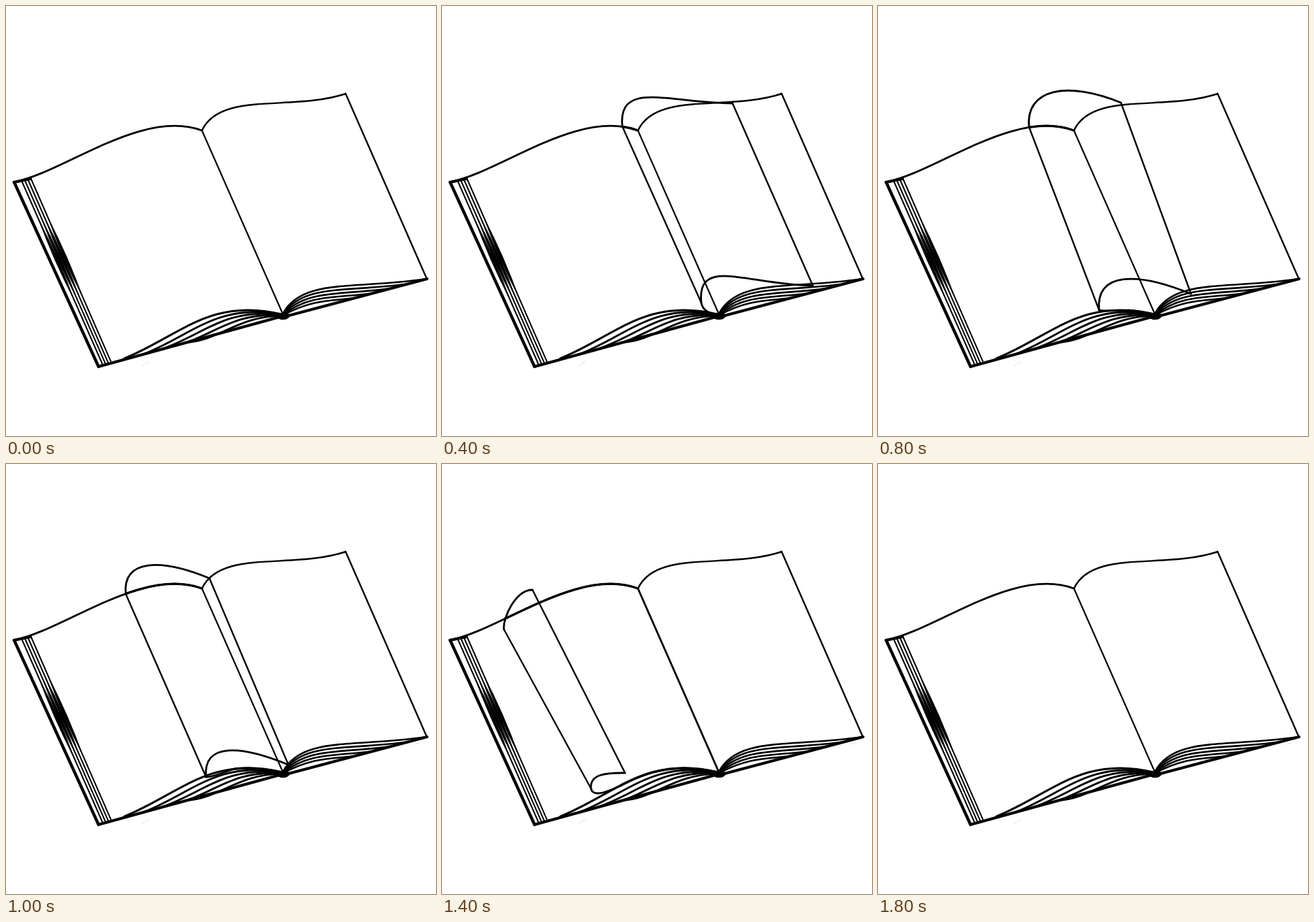
An HTML page with a canvas for the animation above (1.9 s loop, 632 by 632 pixels).

```html
<!DOCTYPE html>
<html lang="en">
<head>
<meta charset="utf-8">
<title>Turning page</title>
<style>
  html, body { margin: 0; width: 100%; height: 100%; overflow: hidden; background: #fff; }
  canvas { display: block; width: 632px; height: 632px; }
</style>
</head>
<body>
<canvas id="stage" width="632" height="632"></canvas>
<script>
const SIZE = 632, STEP = 100, STEPS = 19;
const ctx = document.getElementById('stage').getContext('2d');

const SPINE = [[288, 183], [407, 453]];
const RIGHT_EDGE = [[499, 128.5], [618.5, 401]];
const LEFT_EDGE = [[12, 259], [136, 530]];
const LEFT_TOP = [[11, 259], [85, 245], [200, 150], [288, 183]];
const RIGHT_TOP = [[288, 183], [315, 125], [420, 155], [499, 129]];
const LEFT_BOTTOM = [[174, 518], [255, 485], [300, 428], [405, 453]];

// Ends of the sheet's fold and of its free edge at a few steps of the turn.
const POSES = [
  { step: 0, fold: SPINE, free: RIGHT_EDGE },
  { step: 4, fold: [[265, 177], [381, 436]], free: [[427, 143], [545, 411]] },
  { step: 8, fold: [[222, 178], [325, 447]], free: [[357, 142], [460, 423]] },
  { step: 10, fold: [[176, 191], [294, 460]], free: [[299, 168], [415, 442]] },
  { step: 12, fold: [[119, 200], [249, 458]], free: [[219, 153], [338, 425]] },
  { step: 14, fold: [[91, 243], [219, 477]], free: [[133, 185], [269, 454]] },
  { step: 17, fold: [[26, 254], [160, 504]], free: [[28, 245], [162, 502]] }
];

const mix = (a, b, k) => a + (b - a) * k;
const mixPoint = (p, q, k) => [mix(p[0], q[0], k), mix(p[1], q[1], k)];

function poseAt(step) {
  const next = Math.max(1, POSES.findIndex(p => p.step >= step));
  const a = POSES[next - 1], b = POSES[next];
  const k = (step - a.step) / (b.step - a.step);
  const between = edge => a[edge].map((p, i) => mixPoint(p, b[edge][i], k));
  return { fold: between('fold'), free: between('free') };
}

function pointOn(curve, k) {
  let pts = curve;
  while (pts.length > 1) pts = pts.slice(1).map((p, i) => mixPoint(pts[i], p, k));
  return pts[0];
}

function pointAtX(curve, x) {
  let low = 0, high = 1;
  for (let i = 0; i < 20; i++) {
    const mid = (low + high) / 2;
    if (pointOn(curve, mid)[0] < x) low = mid; else high = mid;
  }
  return pointOn(curve, low);
}

function stroke(width, color = '#000') {
  ctx.lineWidth = width;
  ctx.strokeStyle = color;
  ctx.stroke();
}

function line([a, b], width, color) {
  ctx.beginPath();
  ctx.moveTo(...a);
  ctx.lineTo(...b);
  stroke(width, color);
}

function curve([a, b, c, d], width) {
  ctx.beginPath();
  ctx.moveTo(...a);
  if (d) ctx.bezierCurveTo(...b, ...c, ...d);
  else ctx.quadraticCurveTo(...b, ...c);
  stroke(width);
}

// A sliver that swells in the middle, lying along the line a-b.
function lens(a, b, swell) {
  const [x, y] = mixPoint(a, b, 0.5);
  ctx.beginPath();
  ctx.moveTo(...a);
  ctx.quadraticCurveTo(x - swell, y, ...b);
  ctx.quadraticCurveTo(x + swell, y, ...a);
  ctx.fill();
}

function rightOf(x, draw) {
  ctx.save();
  ctx.beginPath();
  ctx.rect(x, 0, SIZE - x, SIZE);
  ctx.clip();
  draw();
  ctx.restore();
}

function drawLeftSide() {
  line(LEFT_EDGE, 4.4);
  line([[12, 259], [36, 254]], 4);
  for (let i = 0; i < 4; i++) {
    const a = [23 + 4.6 * i, 257 - i], b = [142 + 4 * i, 527 - 1.6 * i];
    line([a, b], 2);
    lens(mixPoint(a, b, 0.2), mixPoint(a, b, 0.66), 5.5);
  }
}

function drawPageEnds() {
  const leftBase = x => [x, 530 - (x - 136) * 0.274];
  const rightBase = x => [x, 456 - (x - 410) * 0.264];
  line([LEFT_EDGE[1], [406, 456]], 4.4);
  line([[408, 457], [619, 401]], 4);
  curve(LEFT_BOTTOM, 3);
  for (let i = 1; i < 5; i++) {
    curve([leftBase(178 + 22 * i), [255 + 15 * i, 485 + 1.5 * i],
      [300 + 10 * i, 428 + 7 * i], [405, 453 + 0.6 * i]], 2.9);
  }
  for (let i = 0; i < 5; i++) {
    curve([[407, 452 + 0.7 * i], [435 + 3 * i, 400 + 8 * i],
      [510 - 8 * i, 417 + 4 * i], rightBase(618 - 27 * i)], 2.6);
  }
  ctx.beginPath();
  ctx.ellipse(408, 456, 9, 5, -0.1, 0, Math.PI * 2);
  ctx.fill();
}

function drawBook() {
  curve(LEFT_TOP, 2.9);
  curve(RIGHT_TOP, 2.4);
  line(RIGHT_EDGE, 2.4);
  line(SPINE, 2.2);
  drawLeftSide();
  drawPageEnds();
  line([[200, 529], [211, 522]], 1, '#e4e4e4');
  line([[601, 412], [608, 410]], 1, '#e4e4e4');
}

function drawSheet(step) {
  const { fold, free } = poseAt(step);
  const rise = 0.42 * Math.min(1, 0.55 + 0.12 * step);
  const lift = 0.28 * Math.exp(-(((step - 9) / 2.5) ** 2));

  fold.forEach((a, i) => {
    const b = free[i], width = b[0] - a[0];
    curve([a, [a[0] - 0.04 * width, a[1] - rise * width],
      [b[0] - 0.58 * width, b[1] - lift * width], b], 2.8);
  });
  line(fold, 2.4);
  line(free, 2.4);

  // Below the fold the sheet settles onto the left page.
  const [x, y] = fold[1];
  const contact = pointAtX(LEFT_BOTTOM, Math.min(405, x + 42));
  curve([fold[1], [x + 3, y + 16 - 60 * lift], contact], 2.8);
  rightOf(contact[0], () => curve(LEFT_BOTTOM, 3.6));
  rightOf(fold[0][0], () => curve(LEFT_TOP, 3.3));
  if (step > 10) line(SPINE, 2.7);
}

function render() {
  const step = Math.floor(performance.now() / STEP) % STEPS;
  ctx.fillStyle = '#fff';
  ctx.fillRect(0, 0, SIZE, SIZE);
  ctx.fillStyle = '#000';
  ctx.lineJoin = ctx.lineCap = 'round';
  drawBook();
  if (step > 0 && step < STEPS - 1) drawSheet(step);
  requestAnimationFrame(render);
}
render();
</script>
</body>
</html>
```
